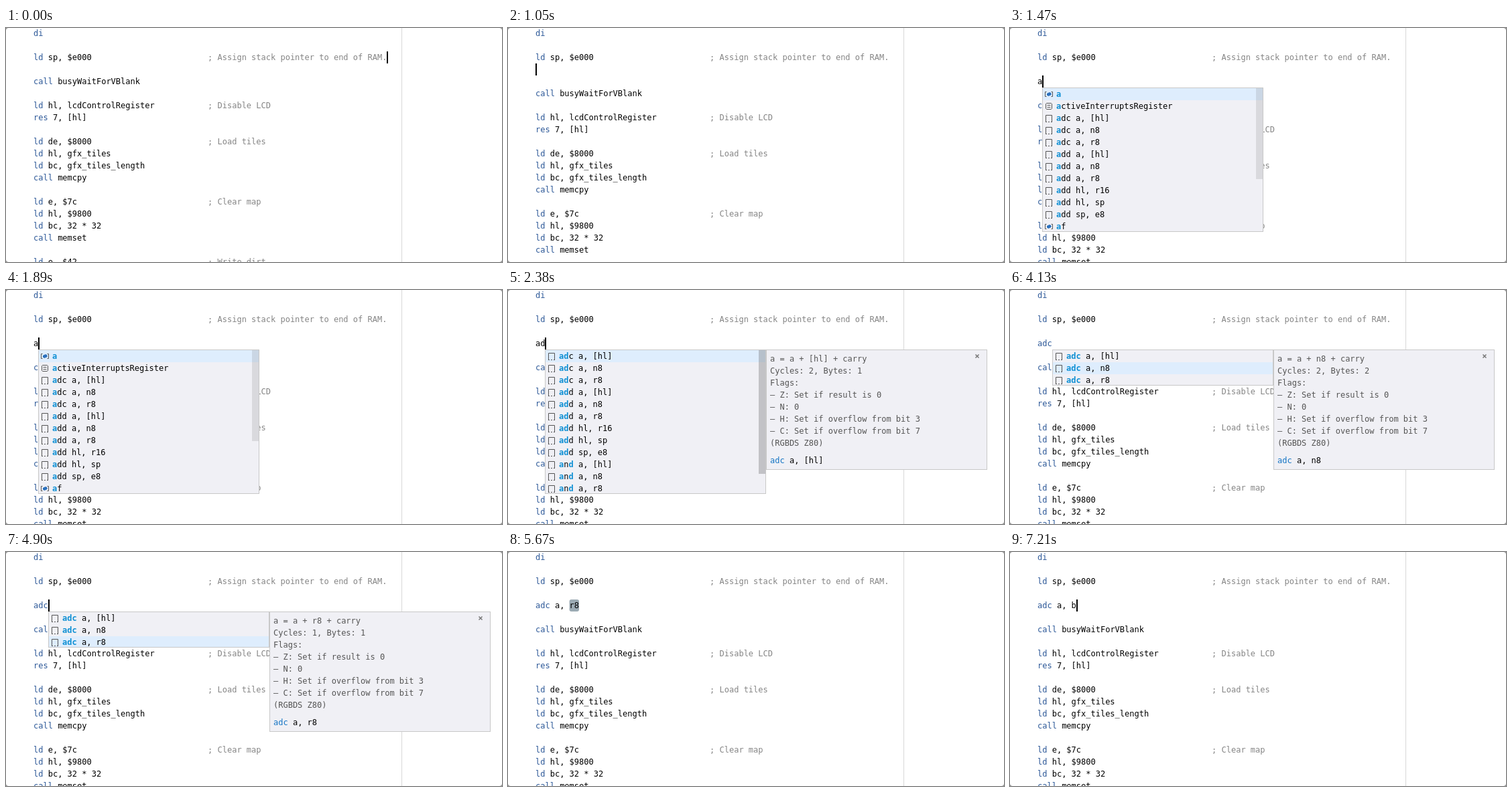
Recreate the animation shown at these times as an HTML page. Size 740 by 350 pixels, loop 7.28 s.

```html
<!DOCTYPE html>
<html lang="en">
<head>
<meta charset="utf-8">
<title>Assembly completion</title>
<style>
  html, body { margin: 0; width: 100%; height: 100%; overflow: hidden; background: #8c8c8c; }
  svg { display: block; width: 740px; height: 350px; background: #fff; border-radius: 4px; }
  text { font: 12px "DejaVu Sans Mono", monospace; fill: #000; }
  .key { fill: #2b5797; }
  .note { fill: #858585; }
  .doc { fill: #555; }
  .code { fill: #1474c4; }
  .hit { fill: #0d8fd4; font-weight: bold; }
  .box { fill: #f0f0f5; stroke: #c8c8c8; }
  .icon { fill: none; stroke: #555; }
</style>
</head>
<body>
<svg id="stage" viewBox="0 0 740 350"></svg>
<script>
const LOOP = 7280, BLINK = 500, LEFT = 41, CHAR = 7.224, ROW = 18;
const stage = document.getElementById('stage');

const head = ['di', '', 'ld sp, $e000; Assign stack pointer to end of RAM.', ''];
const tail = [
  'call busyWaitForVBlank', '',
  'ld hl, lcdControlRegister; Disable LCD', 'res 7, [hl]', '',
  'ld de, $8000; Load tiles', 'ld hl, gfx_tiles', 'ld bc, gfx_tiles_length', 'call memcpy', '',
  'ld e, $7c; Clear map', 'ld hl, $9800', 'ld bc, 32 * 32', 'call memset', '',
  'ld e, $42; Write dirt'
];

const forms = op => ['[hl]', 'n8', 'r8'].map(arg => `${op} a, ${arg}`);
const adc = forms('adc');
const adds = [...adc, ...forms('add'), 'add hl, r16', 'add hl, sp', 'add sp, e8'];
const lists = {
  a: ['a', 'activeInterruptsRegister', ...adds, 'af'],
  ad: [...adds, ...forms('and')],
  adc
};
const cost = [[2, 1], [2, 2], [1, 1]]; // cycles and bytes of each adc form

// Each step changes some fields of the state and, unless told not to, restarts the blink.
const steps = [
  [0, { typed: [], row: 2, col: 73 }],
  [910, { typed: [''], row: 3, col: 0 }],
  [1120, { typed: ['', ''], row: 4 }],
  [1400, { typed: ['a', ''], col: 1 }],
  [1470, { query: 'a', thumb: 136, shade: .17, still: true }],
  [1960, { typed: ['ad', ''], col: 2, query: 'ad', thumb: 185, shade: .33 }],
  [2030, { pick: 0, still: true }],
  [2520, { typed: ['adc', ''], col: 3, query: 'adc', thumb: 0 }],
  [3430, { pick: 1, still: true }],
  [4340, { pick: 2, still: true }],
  [5110, { typed: ['adc a, r8', ''], col: 9, query: '', pick: -1, mark: true }],
  [6090, { typed: ['adc a, b', ''], col: 8, mark: false }]
];

function stateAt(t) {
  const s = { query: '', pick: -1, thumb: 0, shade: 0, mark: false, since: 0 };
  for (const [time, change] of steps) {
    if (time > t) break;
    Object.assign(s, change);
    if (!change.still) s.since = time;
  }
  s.caret = Math.floor((t - s.since) / BLINK) % 2 === 0;
  return s;
}

const text = (x, y, body, cls = '') => `<text x="${x}" y="${y}" class="${cls}">${body}</text>`;
const span = (cls, body) => `<tspan class="${cls}">${body}</tspan>`;
const rect = (x, y, w, h, attrs) => `<rect x="${x}" y="${y}" width="${w}" height="${h}" ${attrs}/>`;

function codeLine(line, row) {
  const [code, note] = line.split(';');
  const y = 12 + row * ROW;
  const body = code.replace(/^(di|ld|call|res|adc)\b/, word => span('key', word));
  return text(LEFT, y, body) + (note ? text(LEFT + 36 * CHAR, y, ';' + note, 'note') : '');
}

function icon(label, x, y) {
  let d;
  if (label.includes(' ')) d = 'M.5 10V.5H9.5V10M0 10.5H2M4 10.5H6M8 10.5H10';
  else if (label.length > 2) d = 'M1.5 .5H8.5L9.5 1.5V8.5L8.5 9.5H1.5L.5 8.5V1.5ZM2.5 3.5H7.5M2.5 6.5H7.5';
  else d = 'M1.5 1.5H-.5V8.5H1.5M8.5 1.5H10.5V8.5H8.5';
  const cube = label.length < 3 ? '<path d="M2 4L6 2L8.5 3.5V6L4.5 8L2 6.5Z" fill="#2a70bd"/>' : '';
  return `<g transform="translate(${x} ${y})"><path class="icon" d="${d}"/>${cube}</g>`;
}

// Highlights the letters of the query in order.
function matched(label, query) {
  let n = 0;
  return [...label].map(c => c === query[n] ? (n++, span('hit', c)) : c).join('');
}

function popup(s, x) {
  const list = lists[s.query], h = list.length * ROW, chosen = Math.max(s.pick, 0);
  let out = rect(x + .5, 89.5, 329, h - 1, 'class="box"');
  out += rect(x + 1, 90 + chosen * ROW, 328, Math.min(ROW, h - 2 - chosen * ROW), 'fill="#deedfd"');
  list.forEach((label, i) => {
    const y = 90 + i * ROW;
    out += icon(label, x + 5, y + 4) + text(x + 21, y + 13, matched(label, s.query));
  });
  if (s.thumb) out += rect(x + 319, 90, 10, s.thumb, `fill="#646464" fill-opacity="${s.shade}"`);
  return out;
}

function details(pick, x) {
  const arg = adc[pick].slice(7), [cycles, bytes] = cost[pick];
  const lines = [
    `a = a + ${arg} + carry`, `Cycles: ${cycles}, Bytes: ${bytes}`, 'Flags:',
    '– Z: Set if result is 0', '– N: 0',
    '– H: Set if overflow from bit 3', '– C: Set if overflow from bit 7', '(RGBDS Z80)'
  ];
  return rect(x + .5, 89.5, 329, 179, 'class="box"') +
    lines.map((line, i) => text(x + 6, 107 + i * ROW, line, 'doc')).join('') +
    text(x + 6, 259, span('code', 'adc') + ` a, ${arg}`) +
    `<path d="M${x + 312.5} 96.5l5 5m0 -5l-5 5" stroke="#777" stroke-width="1.5"/>`;
}

function draw(s) {
  const x = Math.round(LEFT + s.col * CHAR);
  let out = rect(590, 0, 1, 350, 'fill="#d8d8d8"');
  if (s.mark) out += rect(LEFT + 7 * CHAR, 71, 2 * CHAR, ROW, 'rx="3" fill="#9cabb4"');
  out += [...head, ...s.typed, ...tail].map(codeLine).join('');
  if (s.caret) out += rect(x, s.row * ROW - 1, 2, ROW, '');
  if (s.query) out += popup(s, x);
  if (s.pick >= 0) out += details(s.pick, x + 330);
  return out;
}

let shown = '';
const start = performance.now();
function frame() {
  const state = stateAt((performance.now() - start) % LOOP);
  const key = JSON.stringify(state);
  if (key !== shown) {
    stage.innerHTML = draw(state);
    shown = key;
  }
  requestAnimationFrame(frame);
}
frame();
</script>
</body>
</html>
```
